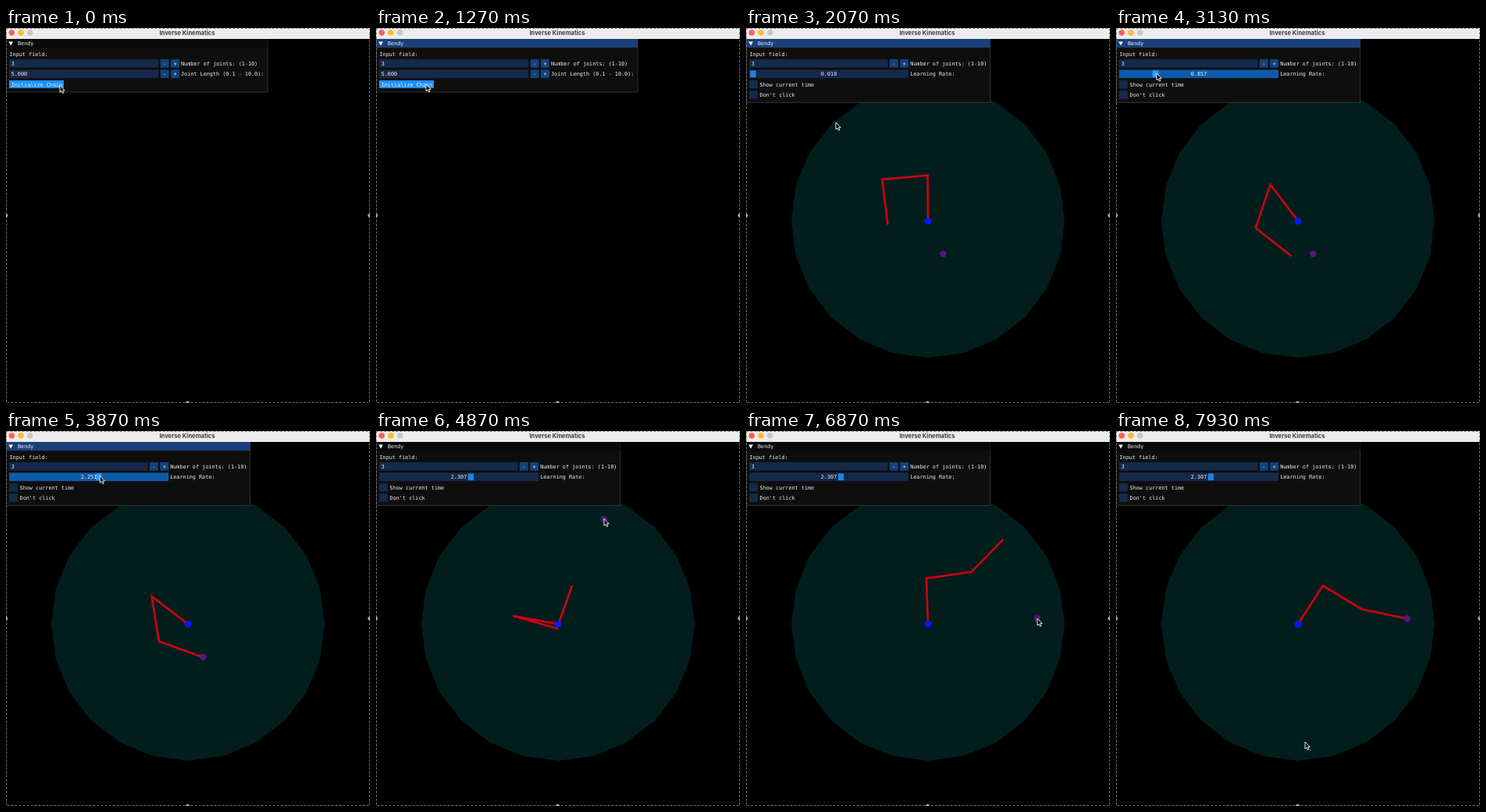
Recreate the animation shown at these times as an HTML page. Size 466 by 480 pixels, loop 8 s.

```html
<!DOCTYPE html>
<html lang="en">
<head>
<meta charset="utf-8">
<title>Inverse Kinematics</title>
<style>
  html, body { margin: 0; width: 100%; height: 100%; overflow: hidden; background: #000; }
  svg { display: block; width: 100vw; height: 100vh; }
  text { font: 6.8px "DejaVu Sans Mono", "Noto Sans Mono", monospace; fill: #f2f2f2; }
  .heading { font: 700 7.6px Inter, "Liberation Sans", sans-serif; fill: #3c3c3c; }
</style>
</head>
<body>
<svg id="stage" viewBox="0 0 466 480">
  <g id="scene">
    <polygon id="reach" fill="#021e1c"/>
    <polyline id="chain" fill="none" stroke="#cf0012" stroke-width="2.6"/>
    <circle id="goal" r="4.2" fill="#541680"/>
    <circle cx="233" cy="247.3" r="4.4" fill="#0018ff"/>
  </g>
  <g id="setup"></g>
  <g id="control"></g>
  <rect width="466" height="14" fill="#ececec"/>
  <circle cx="7.3" cy="6" r="3.8" fill="#fe5f57"/>
  <circle cx="19" cy="6" r="3.8" fill="#febc2e"/>
  <circle cx="30.8" cy="6" r="3.8" fill="#c8c8c8"/>
  <text class="heading" x="232" y="8.5" text-anchor="middle">Inverse Kinematics</text>
  <rect x=".5" y=".5" width="465" height="479" fill="none" stroke="#777" stroke-dasharray="3 2"/>
  <g fill="#a0a0a0">
    <circle cx="0" cy="240" r="2.4"/>
    <circle cx="465.5" cy="240" r="2.4"/>
    <circle cx="232.5" cy="480" r="2.6"/>
  </g>
  <path id="cursor" d="M0 0V8.8L2 7L3.4 10L5 9.4L3.6 6.4H6.2Z" fill="#000" stroke="#fff" stroke-width=".9" stroke-linejoin="round"/>
</svg>
<script>
const LOOP = 8000, LINK = 58.4, BASE = [233, 247], RAD = Math.PI / 180;
const FOCUS = 870, START = 1400, GRAB = 3070, DROP = 4000, CLICK = 4660, CLICK2 = 6730;
const FRAME = '#15294a', HOVER = '#124c87', ACTIVE = '#0d5ba8', BLUE = '#1a4077', DARK = '#0a0a0a';
const ROW = 13.4, rowY = i => 40 + ROW * i;
const $ = id => document.getElementById(id);

function add(parent, tag, attrs, text) {
  const el = document.createElementNS('http://www.w3.org/2000/svg', tag);
  for (const k in attrs) el.setAttribute(k, attrs[k]);
  if (text) el.textContent = text;
  return parent.appendChild(el);
}
const box = (g, x, y, width, fill = FRAME, height = 10.7) =>
  add(g, 'rect', { x, y, width, height, fill });
const label = (g, x, y, text, anchor = 'start') =>
  add(g, 'text', { x, y: y + 7.8, 'text-anchor': anchor }, text);

// Window frame, title bar and heading; returns the title bar.
function panel(g, w, bottom) {
  add(g, 'rect', { x: .5, y: 14, width: w - .5, height: bottom - 14, fill: '#0e0e0e', stroke: '#3e3e44', 'stroke-width': .8 });
  const bar = box(g, 0, 14, w, DARK, 11.2);
  add(g, 'path', { d: 'M3.3 17.4H9L6.15 22.4Z', fill: '#fff' });
  label(g, 15, 14.4, 'Bendy');
  label(g, 4.5, 28.5, 'Input field:');
  return bar;
}
function stepper(g, row, w, value, text) {
  const y = rowY(row), right = 4 + w;
  box(g, 4, y, w);
  label(g, 6.7, y, value);
  ['-', '+'].forEach((sign, i) => {
    const x = right + 2.3 + ROW * i;
    box(g, x, y, 11, '#13437c');
    label(g, x + 5.5, y, sign, 'middle');
  });
  label(g, right + 28.7, y, text);
}
function checkbox(g, row, text) {
  label(g, 17.6, rowY(row), text);
  return box(g, 4, rowY(row), 11);
}

const setup = $('setup'), control = $('control');
const setupBar = panel(setup, 335, 82);
stepper(setup, 0, 191.3, '3', 'Number of joints: (1-10)');
stepper(setup, 1, 191.3, '5.000', 'Joint Length (0.1 - 10.0):');
const button = box(setup, 4, 67, 70, '#1e90ff', 10);
label(setup, 6.7, rowY(2), 'Initialize Chain');

const controlBar = panel(control, 312.7, 95.3);
stepper(control, 0, 177.5, '3', 'Number of joints: (1-10)');
const slider = box(control, 4, rowY(1), 204);
const knob = box(control, 0, rowY(1) + 1, 7.4, '#1f82e4', 8.7);
const rate = label(control, 106, rowY(1), '', 'middle');
label(control, 210.2, rowY(1), 'Learning Rate:');
const checks = [checkbox(control, 2, 'Show current time'), checkbox(control, 3, "Don't click")];

const polar = (r, deg, [x, y]) => [x + r * Math.cos(deg * RAD), y + r * Math.sin(deg * RAD)];
const path = points => points.map(p => p.map(n => n.toFixed(2)).join()).join(' ');
$('reach').setAttribute('points', path(Array.from({ length: 24 }, (_, i) => polar(175, i * 15, BASE))));

// Each move: begin, end, values reached; eased from wherever the last one ended.
const smooth = u => u * u * (3 - 2 * u);
function follow(start, moves, t) {
  return moves.reduce((from, [begin, end, to]) => {
    const u = smooth(Math.min(1, Math.max(0, (t - begin) / (end - begin))));
    return from.map((v, i) => v + (to[i] - v) * u);
  }, start);
}
const pointer = t => follow([69, 73.5], [
  [70, 400, [64, 72]],
  [1470, 2070, [115, 121]],
  [2130, 2930, [50, 72]],
  [2930, GRAB, [52, 58]],
  [3130, 3970, [123, 57.5]],
  [4070, 4530, [292, 112.3]],
  [4930, 5670, [361, 220.8]],
  [5670, 6200, [373, 240]],
  [7200, 7400, [338, 326]],
  [7530, 7930, [242, 398]]
], t);
// Direction of each link in degrees; the second click makes the chain overshoot first.
const pose = t => follow([-90.5, -185, -277], [
  [2070, 3730, [-142.7, -279, -340.3]],
  [CLICK, 4870, [-170, -344.2, -430.6]],
  [4870, 5400, [-106, -383.5, -428.2]],
  [CLICK2, 7130, [-56.9, -329, -348.3]]
], t);

const tick = k => Math.round(k * 20 / 3) * 10;

function draw(ms) {
  let k = Math.floor((ms + 5) * 3 / 200);
  if (tick(k) > ms) k--;
  const t = tick(k), running = t >= START;
  const [x, y] = pointer(t);
  $('cursor').setAttribute('transform', `translate(${x} ${y})`);

  $('scene').style.display = control.style.display = running ? '' : 'none';
  setup.style.display = running ? 'none' : '';
  setupBar.setAttribute('fill', t >= FOCUS ? BLUE : DARK);
  button.setAttribute('fill', t >= FOCUS && t < 1130 ? '#0f84f4' : '#1e90ff');
  if (!running) return;

  controlBar.setAttribute('fill', t < CLICK ? BLUE : DARK);
  const inRow = (row, right) => x < right && y > rowY(row) && y < rowY(row) + 10.7;
  const held = t >= GRAB && t < DROP;
  const grip = t < GRAB ? 9 : pointer(Math.min(t, DROP))[0] - 1.5;
  slider.setAttribute('fill', held ? ACTIVE : inRow(1, 208) ? HOVER : FRAME);
  rate.textContent = (.01 + (grip - 9) / 48.97).toFixed(3);
  knob.setAttribute('x', grip - 3.7);
  knob.setAttribute('fill', held ? '#3199ff' : '#1f82e4');
  checks.forEach((c, i) => c.setAttribute('fill', inRow(2 + i, 88) ? HOVER : FRAME));

  const goal = t < CLICK ? [252.3, 289.3] : t < CLICK2 ? [291.8, 113] : [372.8, 240];
  $('goal').setAttribute('cx', goal[0]);
  $('goal').setAttribute('cy', goal[1]);
  const joints = [BASE];
  pose(t).forEach((deg, i) => joints.push(polar(LINK, deg, joints[i])));
  $('chain').setAttribute('points', path(joints));
}

const begin = performance.now();
function loop() {
  draw((performance.now() - begin) % LOOP);
  requestAnimationFrame(loop);
}
loop();
</script>
</body>
</html>
```
